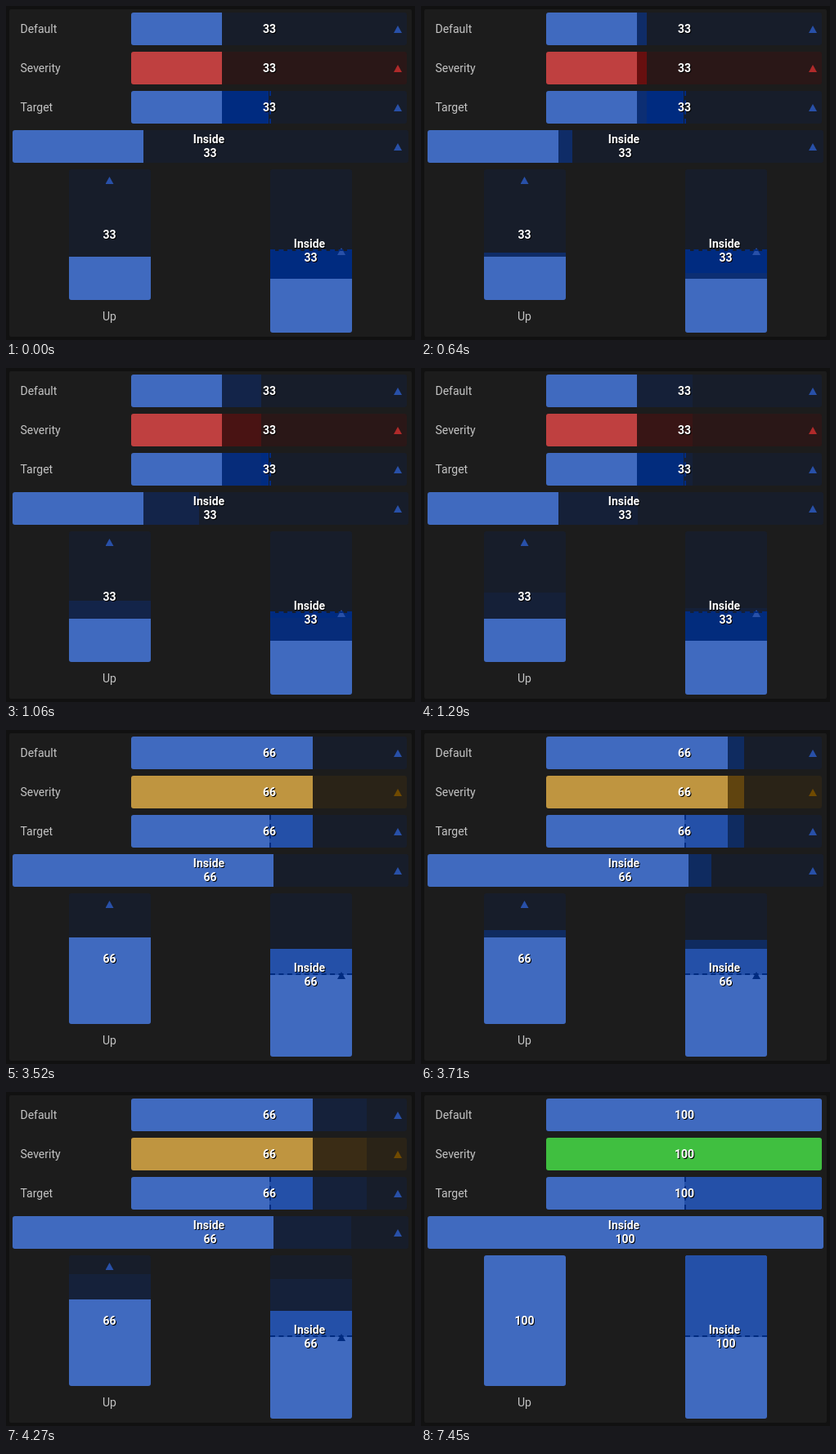
An HTML page for the animation above (8000 ms loop, 500 by 409 pixels).

```html
<!DOCTYPE html>
<html lang="en">
<head>
<meta charset="utf-8">
<style>
html, body { margin: 0; width: 100%; height: 100%; overflow: hidden; background: #111; }
body { font: 14px/16px Roboto, sans-serif; color: #c4c4c4; }
div { position: absolute; box-sizing: border-box; }
#card { left: 4px; top: 4px; width: 492px; height: 401px; background: #1c1c1c; border-radius: 2px; }
.bar { border-radius: 3px; overflow: hidden; }
.text { transform: translate(-50%, -50%); white-space: nowrap; }
.label { transform: translateY(-50%); left: 17.5px; }
.bold { font-weight: 700; color: #fff; text-shadow: 1px 1px #000; }
.arrow { width: 10px; height: 9px; clip-path: polygon(50% 0, 100% 100%, 0 100%); }
.mark { border: 0 dashed #002b80; }
</style>
</head>
<body>
<div id="card"></div>
<script>
// Each palette: fill, track, rising band, arrow
const BLUE = ['#406abf', '#171d2a', '#0e2f71', '#2850a8'];
const RED = ['#bf4040', '#2a1717', '#710e0e', '#b02a2a'];
const GOLD = ['#bf9540', '#2a2317', '#714e0e', '#704a00'];
const GREEN = ['#40bf40', '#172a17', '#0e710e', '#2aaa2a'];
const DARK = '#002b80', OVER = '#2450a8';

function add(parent, className, style, text = '') {
  const el = document.createElement('div');
  el.className = className;
  el.textContent = text;
  for (const key in style) {
    const v = style[key];
    el.style[key] = typeof v === 'number' ? v + 'px' : v;
  }
  return parent.appendChild(el);
}

const label = (top, text) => add(document.body, 'label', { top }, text);
const title = (left, top, text, bold) =>
  add(document.body, 'text' + (bold ? ' bold' : ''), { left, top }, text);

// Place a part so it covers the span from a to b percent of its bar
function span(el, up, a, b) {
  const size = Math.max(0, b - a) + '%';
  Object.assign(el.style, up
    ? { left: 0, width: '100%', bottom: a + '%', height: size }
    : { top: 0, height: '100%', left: a + '%', width: size });
}

function makeBar({ box: [left, top, width, height], value, arrow, up, target, severity }) {
  const track = add(document.body, 'bar', { left, top, width, height });
  const goal = target && add(track, '', {});
  const band = add(track, '', {});
  const fill = add(track, '', {});
  const over = target && add(track, '', { background: OVER });
  const tip = add(document.body, 'arrow', { left: arrow[0] - 5, top: arrow[1] - 4.5 });
  if (target) {
    goal.style.background = DARK;
    const mark = up
      ? { left, top: top + height / 2 - 2, width, height: 2, borderTopWidth: 2 }
      : { left: left + width / 2, top, width: 2, height, borderLeftWidth: 2 };
    add(document.body, 'mark', mark);
  }
  const number = title(value[0], value[1], '', true);

  return (percent, rise, opacity) => {
    const tone = !severity ? BLUE : percent < 50 ? RED : percent < 100 ? GOLD : GREEN;
    track.style.background = tone[1];
    fill.style.background = tone[0];
    band.style.background = tone[2];
    band.style.opacity = opacity;
    span(fill, up, 0, percent);
    span(band, up, percent, percent + rise);
    if (target) {
      span(goal, up, percent, 50);
      span(over, up, 50, percent);
    }
    tip.style.background = target && up && percent > 50 ? DARK : tone[3];
    tip.style.visibility = percent < 100 ? 'visible' : 'hidden';
    number.textContent = percent;
  };
}

label(28, 'Default');
label(76, 'Severity');
label(124, 'Target');
title(126.5, 380, 'Up');

const bars = [
  { box: [153, 8, 337, 40], value: [322, 28], arrow: [479, 28.5] },
  { box: [153, 56, 337, 40], value: [322, 76], arrow: [479, 76.5], severity: true },
  { box: [153, 104, 337, 40], value: [322, 124], arrow: [479, 124.5], target: true },
  { box: [8, 152, 484, 40], value: [249.5, 180], arrow: [479, 172.5] },
  { box: [77, 200, 100, 160], value: [126.5, 280], arrow: [126.5, 213.5], up: true },
  { box: [323, 200, 100, 200], value: [372.5, 308], arrow: [410, 300.5], up: true, target: true }
].map(makeBar);

title(248, 163, 'Inside', true);
title(371, 291, 'Inside', true);

// The band climbs in 17 small steps while fading, then rests
function climb(elapsed, duration, step) {
  const k = Math.min(16, Math.round(elapsed / duration * 16));
  return step * (k + 1);
}

function draw(now) {
  const t = now % 8000;
  const percent = t < 3520 ? 33 : t < 7450 ? 66 : 100;
  let rise = 0;
  if (t >= 550 && t < 3520) rise = climb(t - 550, 740, 1.18);
  else if (t >= 3560 && t < 7450) rise = climb(t - 3520, 750, 1.15);
  for (const update of bars) update(percent, rise, 1 - rise / 25);
  requestAnimationFrame(draw);
}
requestAnimationFrame(draw);
</script>
</body>
</html>
```
